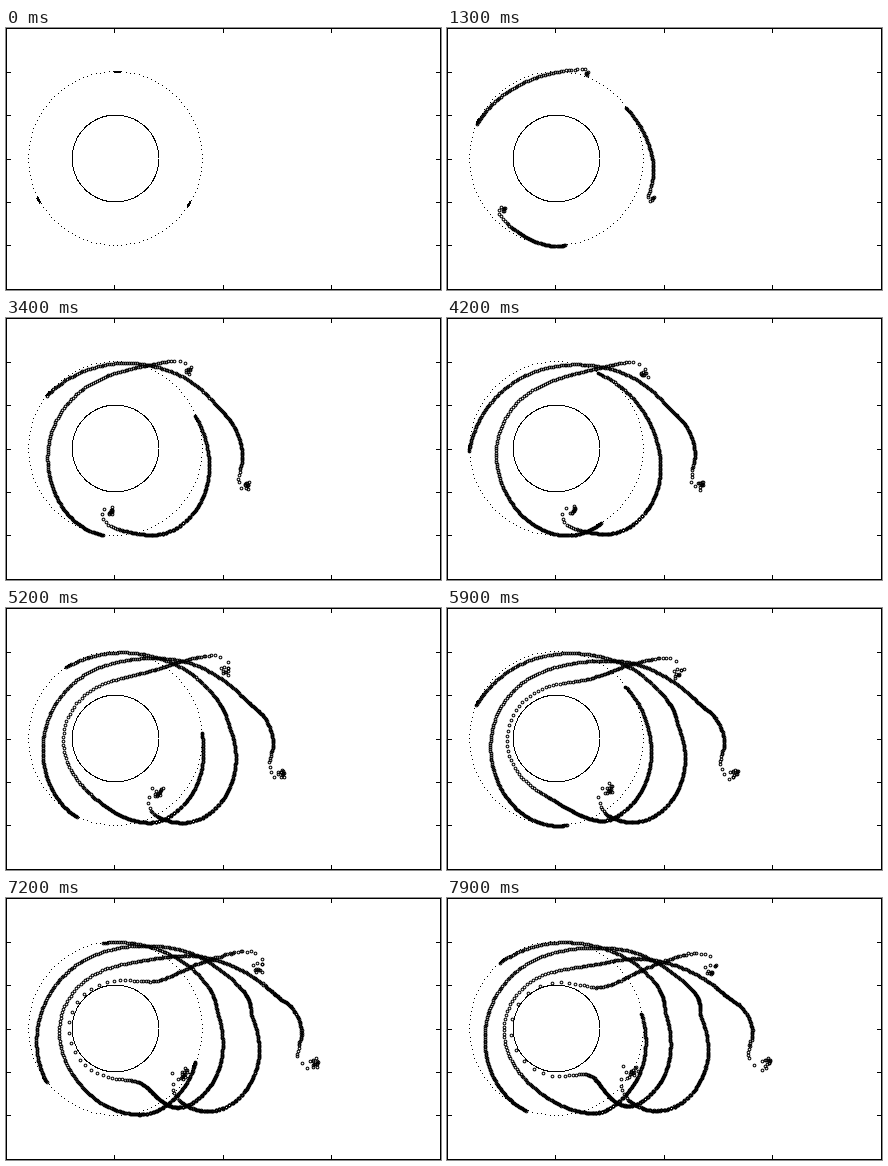
Write a matplotlib script that moves like this. It is 435 by 262 pixels and loops after 8000 ms.

```python
import numpy as np
import matplotlib.pyplot as plt
from matplotlib.animation import FuncAnimation

W, H, DPI = 435, 262, 64
PX = 72 / DPI
CX, CY, UNIT = 109, 131, 43.4
FRAMES, INTERVAL = 80, 100

STEP = 1                                # rotor degrees per simulation step
STEPS = 401
WIND = 0.37 / UNIT                      # free stream per rotor degree
STARTS = np.array([90, 330, 210])       # initial blade angles
SPIN = np.array([-6e-4, 5e-4, -8e-4])   # strength of the starting vortices
GROUP = 4                               # dots that merge into one bead
rng = np.random.default_rng(4)


def ramp(x, a, b):
    t = np.clip((x - a) / (b - a), 0, 1)
    return t * t * (3 - 2 * t)


def polar(r, deg):
    return r * np.exp(1j * np.radians(deg))


def px(z):
    return CX + UNIT * np.real(z), CY - UNIT * np.imag(z)


def flow(z, turn):
    """Stream past a cylinder, slowed and bent around the rotor."""
    x, y = z.real, z.imag
    v = WIND * np.conj(1 - 1 / z**2)
    front = 1.73 + 0.0079 * turn
    loaded = ramp(turn, 80, 330)
    wake = ramp(x, 0.4, 1.2) * ramp(front - x, 0, 1.2) * (1 - ramp(y, 0.3, 1.2))
    v = v * (1 - (0.08 + 0.2 * loaded) * wake)
    v = v * (1 - 0.12 * loaded * ramp(-x, 0.2, 1))
    sink = ramp(x, 1.3, 2.2) * ramp(y, 0.5, 1.2)
    return v - 0.14j * WIND * sink


def velocity(z, turn, pull):
    v = flow(z, turn)
    d = z - z[:, :1]
    r2 = np.abs(d)**2
    v += 1j * SPIN[:, None] * d / (r2 + 0.003)
    return v - 0.02 * pull * d * np.exp(-r2 / 0.1)


def simulate():
    born = np.arange(STEPS) * STEP
    pull = np.exp(-(born / 11)**2)
    z = np.empty((3, 0), complex)
    history = []
    for n in range(STEPS):
        turn = n * STEP
        z = np.hstack([z, polar(2, STARTS + turn)[:, None]])
        history.append(z.copy())
        w = pull[:n + 1]
        mid = z + STEP / 2 * velocity(z, turn, w)
        z = z + STEP * velocity(mid, turn, w)
    return history, born, pull


HISTORY, BORN, PULL = simulate()
SCATTER = rng.uniform(-1, 1, (3, STEPS)) + 1j * rng.uniform(-1, 1, (3, STEPS))
EMIT = (STARTS[:, None] + BORN) % 360


def trail(n):
    """Wake dots after n steps: loose starting knots, beads from below."""
    z = HISTORY[n].copy()
    count = n + 1
    turn = n * STEP
    full = count // GROUP * GROUP
    mean = z[:, :full].reshape(3, -1, GROUP).mean(axis=2)
    emit = EMIT[:, :full]
    bead = (emit > 268) & (emit < 308)
    tight = 0.75 * bead * ramp(turn - BORN[:full], 10, 60)
    z[:, :full] += tight * (np.repeat(mean, GROUP, axis=1) - z[:, :full])
    loose = 0.12 * turn / 400 * PULL[:count]
    loose = loose + 0.012 * ramp(turn - BORN[:count], 150, 400)
    return z + loose * SCATTER[:, :count]


def rotor_turn(i):
    return np.interp(i, [0, 13, 26, 42, 45, 51, 52, 65, 79],
                     [0, 66, 133, 211, 225, 269, 274, 335, 400])


fig = plt.figure(figsize=(W / DPI, H / DPI), dpi=DPI, facecolor="white")
ax = fig.add_axes([0, 0, 1, 1])
ax.set(xlim=(0, W), ylim=(H, 0))
ax.axis("off")


def line(x, y, lw=0.4):
    return ax.plot(x, y, color="black", lw=lw * PX, antialiased=False,
                   snap=False)[0]


def pixels(z):
    ax.plot(*px(z), "k,", antialiased=False)


# Box and ticks
line([0.5, W - 0.5, W - 0.5, 0.5, 0.5], [0.5, 0.5, H - 0.5, H - 0.5, 0.5])
for x in (108.5, 217.5, 325.5):
    line([x, x], [0.5, 4.5])
    line([x, x], [H - 4.5, H - 0.5])
for y in (44.5, 87.5, 131.5, 174.5, 217.5):
    line([0.5, 4.5], [y, y])
    line([W - 4.5, W - 0.5], [y, y])

# Cylinder and blade path
pixels(polar(1, np.linspace(1, 359, 400)))
pixels(polar(2, np.arange(126) * 360 / 126))

dots, = ax.plot([], [], "o", ms=2.7 * PX, mew=PX, mec="black", mfc="none",
                antialiased=False)
blades = [line([], [], 1) for _ in STARTS]


def update(i):
    turn = rotor_turn(i)
    if i:
        n = min(int(round(turn / STEP)), STEPS - 1)
        dots.set_data(*px(trail(n).ravel()))
    else:
        dots.set_data([], [])
    for blade, start in zip(blades, STARTS):
        blade.set_data(*px(polar(2, start + turn + np.array([-3, 0]))))
    return [dots, *blades]


anim = FuncAnimation(fig, update, frames=FRAMES, interval=INTERVAL,
                     repeat=True, repeat_delay=0, blit=False)
plt.show()
```
